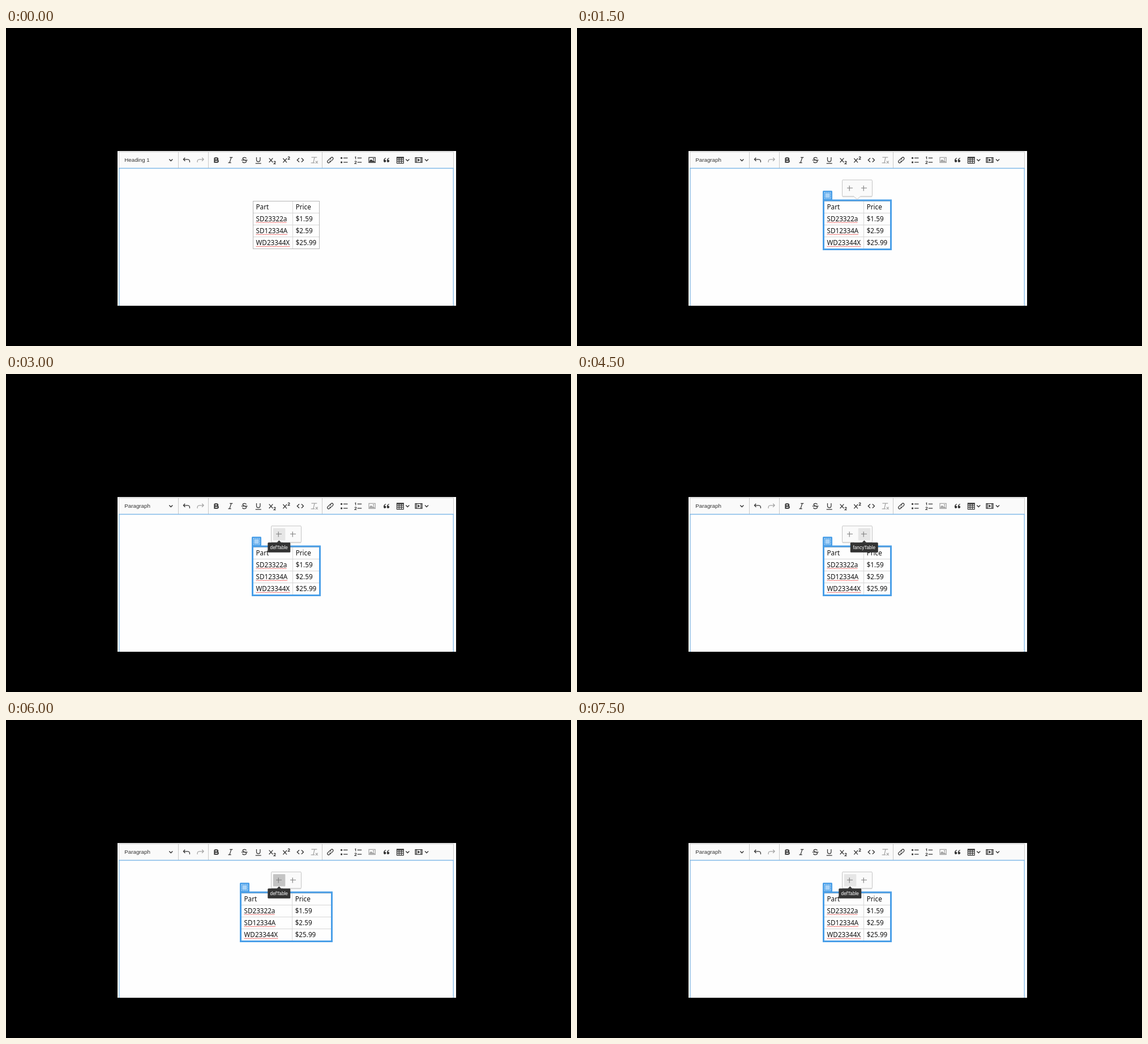
Animation, 998 px wide and 561 px high, one loop 8000 ms. Source, as an HTML page:

```html
<!DOCTYPE html>
<html lang="en">
<head>
<meta charset="utf-8">
<title>Table style toolbar</title>
<style>
  html, body { margin: 0; width: 100%; height: 100%; overflow: hidden; background: #000; }
  svg { display: block; width: 998px; height: 561px; }
  .ui { font-family: "Liberation Sans", Arial, sans-serif; font-size: 9.75px; fill: #333; }
  .tip { font-size: 8.3px; fill: #fff; text-anchor: middle; }
  .cell { font: 11.7px "Noto Sans", "Open Sans", sans-serif; fill: #111; }
  .icon { fill: none; stroke: #333; stroke-width: 1.25; color: #333; }
  .icon.off { stroke: #a3a3a3; color: #a3a3a3; }
  .solid { fill: currentColor; stroke: none; }
</style>
</head>
<body>
<svg id="stage" viewBox="0 0 998 561"></svg>
<script>
const STEP = 1500, LOOP = 8000;
const BLUE = '#4a9fe8';
const PARTS = [['Part', 'Price'], ['SD23322a', '$1.59', 55], ['SD12334A', '$2.59', 56], ['WD23344X', '$25.99', 60]];
const narrow = { left: 436.5, split: 506.5, right: 553.5 };
const wide = { left: 415.5, split: 505.5, right: 574.5 };
const defTip = { text: 'defTable', x: 482.3, width: 40 };
const fancyTip = { text: 'fancyTable', x: 507.3, width: 49 };

const states = [
  { heading: 'Heading 1', table: narrow },
  { table: narrow, selected: true },
  { table: narrow, selected: true, tip: defTip },
  { table: narrow, selected: true, tip: fancyTip },
  { table: wide, selected: true, tip: defTip, pressed: true },
  { table: narrow, selected: true, tip: defTip },
];

const path = (d, attrs = '') => `<path d="${d}" ${attrs}/>`;
const solid = d => path(d, 'class="solid"');
const rect = (x, y, w, h, attrs) => `<rect x="${x}" y="${y}" width="${w}" height="${h}" ${attrs}/>`;
const text = (x, y, cls, s) => `<text x="${x}" y="${y}" class="${cls}">${s}</text>`;
const icon = (x, art, off) => `<g class="icon${off ? ' off' : ''}" transform="translate(${x} 233)">${art}</g>`;

const undo = path('M-2.8-4.2-5.6-1.2-2.6 1.8M-5.4-1.2H2C5-1.2 5.8 1 5.4 4');
const caret = path('M-3-1.4 0 1.6 3-1.4', 'stroke-width="1.4"');
const small2 = (x, y) => path(`M${x} ${y}c.2-1.7 3-1.6 2.9 0-.1 1.2-2 2-2.9 3.2h3.4`, 'stroke-width="1.1"');
const listLines = path('M-1.2-3.7H6.2M-1.2 3.9H6.2');
const quoteMark = x => solid(`M${x}-3.9C${x - 3}-3.3 ${x - 4.4}-.6 ${x - 4} 2A2.2 2.2 0 1 0 ${x - 2.2}-.5C${x - 2}-1.7 ${x - 1.2}-2.4 ${x}-2.8Z`);

const toolbar = [
  [291.3, caret],
  [319, undo],
  [343.5, `<g transform="scale(-1 1)">${undo}</g>`, true],
  [371.5, path('M-3.1-3.8H.8a1.8 1.8 0 0 1 0 3.7H-3.1M.8-.1H1.4a1.95 1.95 0 0 1 0 3.9H-3.1V-3.8', 'stroke-width="2"')],
  [396.4, path('M-1.2-4.6H3.9M-3.9 4.6H1.2M1.5-4.6-1.5 4.6')],
  [421.2, path('M3.2-2.8C2.4-5.2-3-5.1-3-2.4-3-.6 0-.4 1.2.1 4.5 1.4 3.6 4.7 0 4.7-2 4.7-3.2 3.8-3.5 2.6M-5.4 0H5.4')],
  [445.7, path('M-3.2-5V-.5C-3.2 4 3.2 4 3.2-.5V-5M-5 5.8H5')],
  [470.3, path('M-5.6-3.4 1 4M1-3.4-5.6 4') + small2(2.8, 3.4)],
  [495.2, path('M-5.8-3 .8 4.4M.8-3-5.8 4.4') + small2(2.9, -4.6)],
  [519.9, path('M-2-3.6-5.6 0-2 3.6M2-3.6 5.6 0 2 3.6', 'stroke-width="1.35"')],
  [544.7, path('M-5.2-5H4.6M.4-5-1.8 4.6M-6 4.9H.6M2.2 1.6 6 5.8M6 1.6 2.2 5.8'), true],
  [572.8, path('M-.8-2.2 1.6-4.5A2.3 2.3 0 0 1 4.8-1.3L2 1.4A2.3 2.3 0 0 1-1.3 1.2M.8 2.2-1.6 4.5A2.3 2.3 0 0 1-4.8 1.3L-2-1.4A2.3 2.3 0 0 1 1.3-1.2')],
  [597.3, listLines + '<circle class="solid" cx="-4.7" cy="-3.7" r="1.6"/><circle class="solid" cx="-4.7" cy="3.9" r="1.6"/>'],
  [622, listLines + path('M-5.6-4.8-4.4-5.6V-1.4', 'stroke-width="1.1"') + small2(-6, 3)],
  [671.5, quoteMark(-.5) + quoteMark(5.3)],
  [696.3, path('M-5.8-4.8H5.8V5.6H-5.8ZM-5.8-1.2H5.8M-5.8 2.2H5.8M-2-4.8V5.6M2-4.8V5.6') + solid('M-6.4-5.4H6.4V-3.2H-6.4Z')],
  [709.3, caret],
  [729, path('M-6-4.4H6V4.2H-6ZM-4-4.4V4.2M4-4.4V4.2') + solid('M-1.8-2.8 2.5-.1-1.8 2.6Z')],
  [743, caret],
].map(args => icon(...args)).join('');

const picture = path('M-5.6-4.6H5.6V4.4H-5.6Z') + solid('M-4.6 3.4V1.4L-1.8-1.4.8 1.2 2.2 0 4.6 2.2V3.4Z')
  + '<circle class="solid" cx="2.5" cy="-2" r="1.2"/>';

const frame = rect(197, 217, 598, 273, 'fill="#fefefe"')
  + rect(199.5, 218.5, 591, 29, 'fill="#fafafa" stroke="#c9c9c9"')
  + path('M304.5 219V247M357.5 219V247M558.5 219V247', 'stroke="#c9c9c9"')
  + path('M199.8 490V247.5H790.2V490', 'fill="none" stroke="#80b9e8" stroke-width="1.3"')
  + toolbar;

function squiggle(x, y, width) {
  let d = `M${x} ${y}`;
  for (let i = 1; i <= width / 1.5; i++) d += `l1.5 ${i % 2 ? 1.1 : -1.1}`;
  return path(d, 'fill="none" stroke="#e8423f" stroke-width=".8"');
}

function drawTable({ left, split, right }, selected) {
  let out = '';
  for (let i = 1; i < 4; i++) out += path(`M${left} ${Math.round(305 + i * 21.15) + .5}H${right}`, 'stroke="#d6d6d6"');
  out += path(`M${split} 305V390`, 'stroke="#d6d6d6"');
  out += rect(left, 305.5, right - left, 84, 'fill="none" stroke="#b5b5b5"');
  PARTS.forEach(([part, price, width], i) => {
    const y = 319.8 + i * 21.15;
    out += text(left + 5, y, 'cell', part) + text(split + 5.2, y, 'cell', price);
    if (width) out += squiggle(left + 5, y + 1.6, width);
  });
  if (!selected) return out;
  const x = left - 2.5;
  return out
    + rect(left - 1, 304, right - left + 2, 86.5, `fill="none" stroke="${BLUE}" stroke-width="3"`)
    + path(`M${x} 304V288.5q0-1.5 1.5-1.5h14q1.5 0 1.5 1.5V304Z`, `fill="${BLUE}"`)
    + rect(x + 4.5, 291.5, 8, 8, 'fill="#a9d3f7"')
    + rect(x + 3, 290, 11, 11, 'fill="none" stroke="#d9edfd" stroke-dasharray="2 1.2"');
}

function drawBalloon(tip, pressed) {
  let out = rect(468.5, 269.5, 53, 29, 'rx="1.5" fill="#000" opacity=".12"')
    + rect(468.5, 268, 53, 29, 'rx="1.5" fill="#fafafa" stroke="#c4c4c4"')
    + path('M488.5 296.5 494.8 302.5 501 296.5', 'fill="#fafafa" stroke="#c4c4c4"')
    + path('M489 296.5H500.5', 'stroke="#fafafa" stroke-width="1.6"');
  if (tip) out += rect(tip.x - 10.5, 272, 21.5, 21.5, `rx="1" fill="${pressed ? '#c4c4c4' : '#e6e6e6'}"`);
  for (const x of [482, 507]) out += path(`M${x - 5} 282.3H${x + 5}M${x - .8} 278V287.5`, 'stroke="#7c7c7c" stroke-width="1.1"');
  if (tip) out += rect(tip.x - tip.width / 2, 297.3, tip.width, 17.4, 'rx="1.5" fill="#333"')
    + path(`M${tip.x - 4} 297.5 ${tip.x} 293.5 ${tip.x + 4} 297.5Z`, 'fill="#333"')
    + text(tip.x, 309, 'ui tip', tip.text);
  return out;
}

const draw = ({ heading = 'Paragraph', table, selected, tip, pressed }) => frame
  + text(209.3, 236.3, 'ui', heading)
  + icon(646.6, picture, selected)
  + drawTable(table, selected)
  + (selected ? drawBalloon(tip, pressed) : '');

const stage = document.getElementById('stage');
let shown = -1;
function tick() {
  const index = Math.floor(performance.now() % LOOP / STEP);
  if (index !== shown) stage.innerHTML = draw(states[shown = index]);
  requestAnimationFrame(tick);
}
tick();
</script>
</body>
</html>
```
